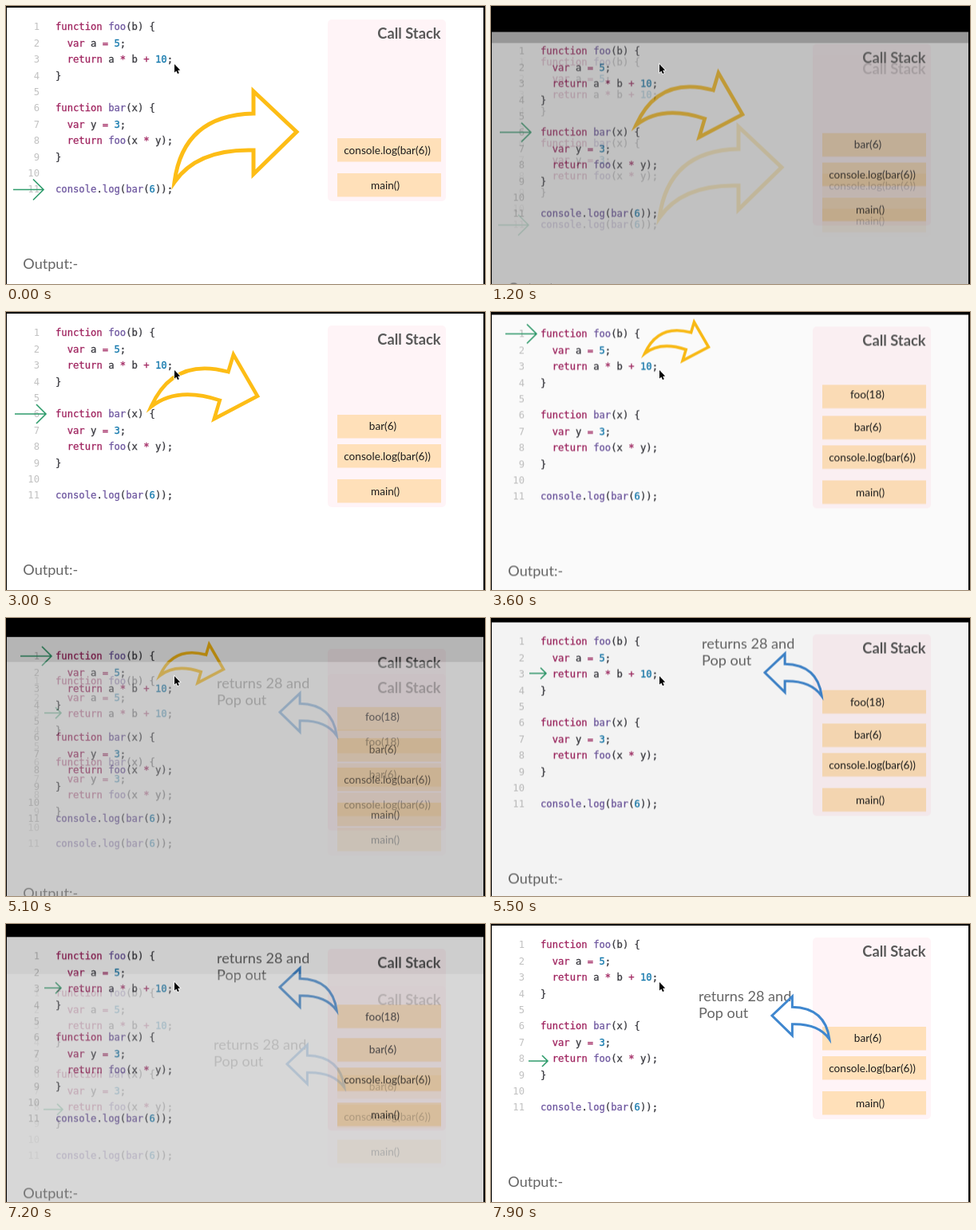
Write an HTML page with a canvas that moves like this. It is 600 by 349 pixels and loops after 8 s.

```html
<!DOCTYPE html>
<html lang="en">
<head>
<meta charset="utf-8">
<title>Call stack walkthrough</title>
<style>
  html, body { margin: 0; width: 100%; height: 100%; overflow: hidden; background: #000; }
  canvas { display: block; }
</style>
</head>
<body>
<canvas id="stage" width="600" height="349"></canvas>
<script>
const W = 600, H = 349, LOOP = 8000;
const SHIFT = 75, FADE = 750;
const STARTS = [1007, 3050, 5020, 7150];
const YELLOW = '#fdbd16', BLUE = '#3f87cf';

const CODE = [
  'function foo(b) {', '  var a = 5;', '  return a * b + 10;', '}', '',
  'function bar(x) {', '  var y = 3;', '  return foo(x * y);', '}', '',
  'console.log(bar(6));'
];

// Centre and baseline of each call's label
const LABELS = {
  'main()': [475, 230],
  'console.log(bar(6))': [477.5, 186],
  'bar(6)': [472, 147.5],
  'foo(18)': [471.5, 106.5]
};

// Curved arrow with its tip at the origin, pointing right
const ARROW = new Path2D(
  'M-153 63Q-142 -21 -54 -23V-51L0 0L-54 53V23Q-124 21 -153 63Z');

// calls: label and box top; pointer: tail x, tip x, y, head size
// arrow: tip x, tip y, scale x, scale y, turn, line width
const SLIDES = [
  { calls: {}, pointer: [9, 47, 230.5, 13], arrow: [364, 158, 1, 1, 0, 5], color: YELLOW },
  { calls: { 'bar(6)': 129 }, pointer: [11, 50, 128, 12],
    arrow: [315, 105.5, .81, .81, 16.6, 4.6], color: YELLOW },
  { calls: { 'bar(6)': 129, 'foo(18)': 90 }, pointer: [18, 57, 26, 12],
    arrow: [272.5, 42.5, .485, .485, 16.6, 3.6], color: YELLOW },
  { calls: { 'bar(6)': 129, 'foo(18)': 87 }, pointer: [48, 69, 66, 7],
    arrow: [343, 65, -.465, .465, 0, 3], color: BLUE, note: [264, 35] },
  { calls: { 'bar(6)': 129 }, pointer: [47, 71, 172, 7],
    arrow: [352, 115, -.47, .47, 0, 3], color: BLUE, note: [260, 97] }
];

function tokenColor(token) {
  if (/^(function|var|return|[*+=])$/.test(token)) return '#a02560';
  if (/^(foo|bar|console|log)$/.test(token)) return '#6f58a0';
  if (/^\d+$/.test(token)) return '#1479ad';
  return '#3a3a40';
}

function text(c, str, x, y, font, color, align = 'left') {
  c.font = font;
  c.fillStyle = color;
  c.textAlign = align;
  c.fillText(str, x, y);
}

function drawCode(c) {
  const mono = '12.2px "DejaVu Sans Mono", monospace';
  c.lineWidth = .3;
  CODE.forEach((line, i) => {
    const y = 30.3 + i * 20.4;
    text(c, i + 1, 42, y, mono, '#c2c2c2', 'right');
    for (const m of line.matchAll(/\w+|[^\w\s]/g)) {
      const x = 62 + m.index * 7.35;
      c.strokeStyle = tokenColor(m[0]);
      text(c, m[0], x, y, mono, c.strokeStyle);
      c.strokeText(m[0], x, y);
    }
  });
}

function drawStack(c, calls) {
  c.fillStyle = '#fff4f7';
  c.beginPath();
  c.roundRect(403, 17, 148, 228, 5);
  c.fill();
  text(c, 'Call Stack', 544.5, 41.3, 'bold 18.3px Lato, sans-serif', '#595959', 'right');
  const stack = { 'main()': 210, 'console.log(bar(6))': 166, ...calls };
  for (const [label, top] of Object.entries(stack)) {
    c.fillStyle = '#ffe0b9';
    c.fillRect(415, top, 130, 29.5);
    text(c, label, ...LABELS[label], '13.6px Lato, sans-serif', '#1c1c1c', 'center');
  }
}

function drawArrow(c, [x, y, sx, sy, turn, width], color) {
  const path = new Path2D();
  path.addPath(ARROW, new DOMMatrix().translate(x, y).rotate(turn).scale(sx, sy));
  c.strokeStyle = color;
  c.lineWidth = width;
  c.stroke(path);
}

function drawPointer(c, [tail, tip, y, size]) {
  c.strokeStyle = '#2f9c6c';
  c.lineWidth = 1.6;
  c.stroke(new Path2D(
    `M${tail} ${y}H${tip}M${tip - size} ${y - size}L${tip} ${y}L${tip - size} ${y + size}`));
}

function makeSlide({ calls, pointer, arrow, color, note }) {
  const canvas = document.createElement('canvas');
  canvas.width = W;
  canvas.height = H;
  const c = canvas.getContext('2d');
  c.fillStyle = '#fff';
  c.fillRect(1, 2, 597, H);
  drawCode(c);
  drawStack(c, calls);
  const big = '18.1px Lato, sans-serif';
  text(c, 'Output:-', 21.3, 330, big, '#666');
  if (note) {
    text(c, 'returns 28 and', note[0], note[1], big, '#666');
    text(c, 'Pop out', note[0], note[1] + 20.7, big, '#666');
  }
  drawArrow(c, arrow, color);
  drawPointer(c, pointer);
  return canvas;
}

const ctx = document.getElementById('stage').getContext('2d');
const pages = SLIDES.map(makeSlide);
const cursor = new Path2D('M211 73V83.5L213.3 81.4L215 85L216.8 84.2L215.2 80.7L218.2 80.5Z');

// A page sits lower the more transparent it is
function drawPage(index, alpha) {
  ctx.globalAlpha = alpha;
  ctx.drawImage(pages[index], 0, SHIFT * (1 - alpha));
}

function drawCursor() {
  ctx.strokeStyle = '#fff';
  ctx.lineWidth = 1.4;
  ctx.stroke(cursor);
  ctx.fillStyle = '#000';
  ctx.fill(cursor);
}

function render(now) {
  const t = now % LOOP;
  const next = STARTS.filter(start => t >= start).length;
  const x = next ? Math.min(1, (t - STARTS[next - 1]) / FADE) : 1;
  const s = 1 - (1 - x) ** 3;

  ctx.globalAlpha = 1;
  ctx.fillStyle = '#000';
  ctx.fillRect(0, 0, W, H);
  if (s < 1) drawPage(next - 1, 1 - s);
  drawPage(next, s);
  ctx.globalAlpha = 1;
  drawCursor();
}

const origin = performance.now();
function tick() {
  render(performance.now() - origin);
  requestAnimationFrame(tick);
}
tick();
</script>
</body>
</html>
```
